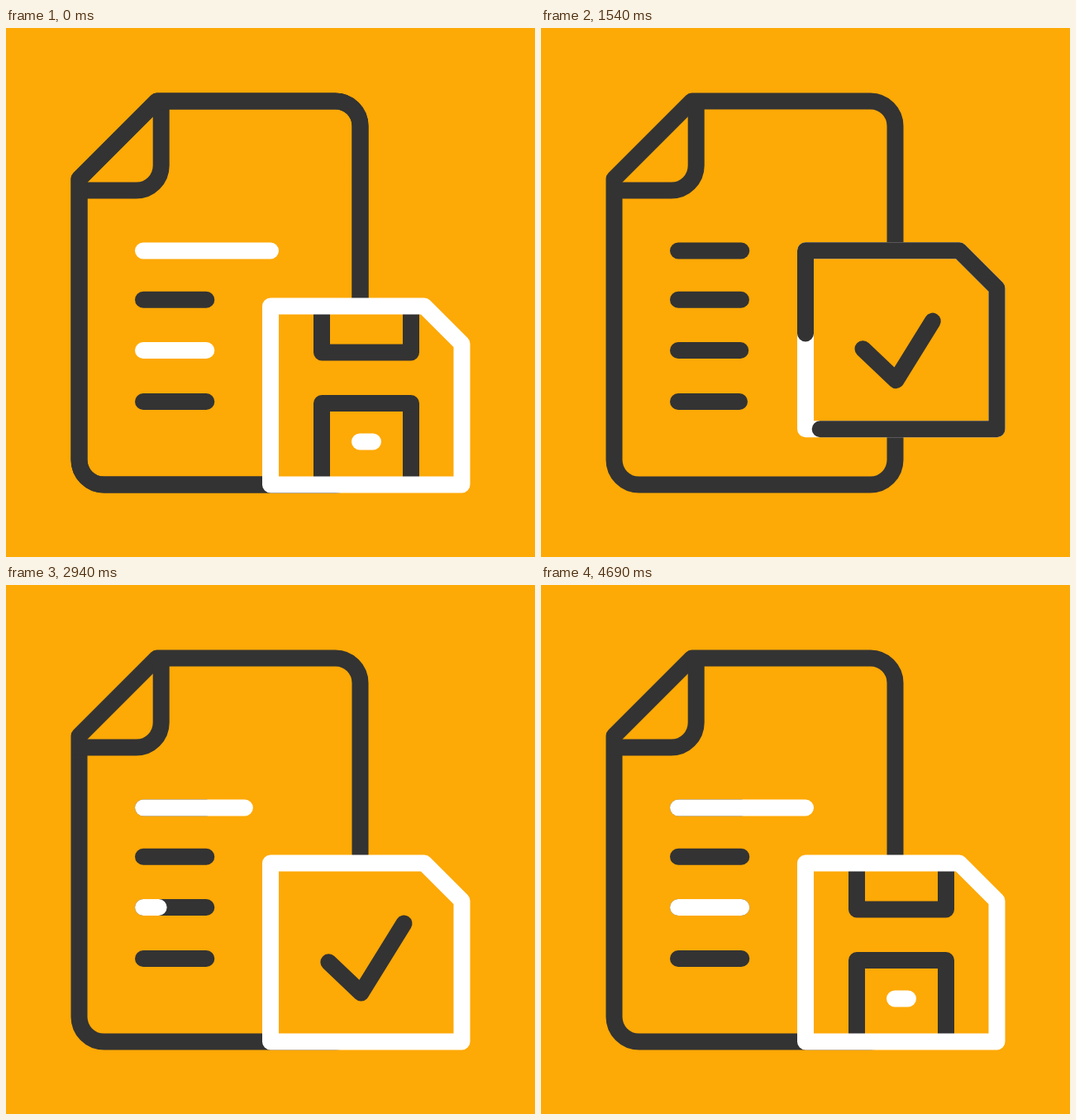
An HTML page with a canvas for the animation above (4.76 s loop, 640 px wide and 640 px high).

```html
<!DOCTYPE html>
<html>
<head>
<meta charset="utf-8">
<style>
html, body { margin: 0; width: 100%; height: 100%; overflow: hidden; background: #fda906; }
canvas { display: block; width: 100vw; height: 100vh; }
</style>
</head>
<body>
<canvas id="stage" width="640" height="640"></canvas>
<script>
const ctx = document.getElementById('stage').getContext('2d');
const LOOP = 4760, STEP = 70;
const BG = '#fda906', DARK = '#333333', WHITE = '#ffffff';

const clamp = v => Math.min(1, Math.max(0, v));
const smooth = (t, start, dur) => { const p = clamp((t - start) / dur); return p * p * (3 - 2 * p); };
const easeOut = (t, start, dur) => 1 - (1 - clamp((t - start) / dur)) ** 3;

function poly(points, closed) {
  const path = new Path2D();
  points.forEach(([x, y], i) => i ? path.lineTo(x, y) : path.moveTo(x, y));
  if (closed) path.closePath();
  return path;
}

function pathLength(points) {
  return points.slice(1).reduce((sum, [x, y], i) => sum + Math.hypot(x - points[i][0], y - points[i][1]), 0);
}

const docOutline = new Path2D('M182.5 88.5H398.5A30 30 0 0 1 428.5 118.5V522.5A30 30 0 0 1 398.5 552.5H118.5A30 30 0 0 1 88.5 522.5V182.5Z');
const docFold = new Path2D('M187.7 90V166.5A30 30 0 0 1 157.7 196.5H90');
const diskPoints = [[320, 336.5], [506, 336.5], [551.5, 382], [551.5, 552.5], [320, 552.5]];
const disk = poly(diskPoints, true);
const diskLength = pathLength([...diskPoints, diskPoints[0]]);
const shutter = poly([[382, 337], [382, 392.5], [490, 392.5], [490, 337]]);
const label = poly([[382, 552], [382, 454], [490, 454], [490, 552]]);
const checkPoints = [[389.5, 455.5], [429.5, 493.5], [481.5, 409.5]];
const check = poly(checkPoints);
const checkLength = pathLength(checkPoints);

const LEFT = 166, RIGHT = 242.3, LONG = 320;
const rows = [269.5, 328.8, 390, 452];

// Time, tail and head of the dark run travelling round the disk outline.
const run = [
  [420, 115, 115], [560, 158, 219], [1120, 446, 934], [1540, 768, 1503],
  [2450, 2135, 2319], [2620, 2430, 2430]
];

function runAt(t, column) {
  const slope = i => (run[i + 1][column] - run[i][column]) / (run[i + 1][0] - run[i][0]);
  const tangent = i => {
    if (i === 0) return slope(0);
    if (i === run.length - 1) return slope(i - 1);
    const a = slope(i - 1), b = slope(i);
    return 2 * a * b / (a + b);
  };
  const i = Math.min(run.length - 2, run.findIndex((k, n) => n < run.length - 1 && t <= run[n + 1][0]));
  const h = run[i + 1][0] - run[i][0], u = (t - run[i][0]) / h, v = 1 - u;
  return v * v * (1 + 2 * u) * run[i][column] + u * u * (3 - 2 * u) * run[i + 1][column]
    + h * u * v * (v * tangent(i) - u * tangent(i + 1));
}

function stroke(path, color) {
  ctx.strokeStyle = color;
  ctx.stroke(path);
}

function strokePart(path, color, from, to, gap) {
  ctx.setLineDash([to - from, gap]);
  ctx.lineDashOffset = -from;
  stroke(path, color);
  ctx.setLineDash([]);
}

function bar(y, end, color) {
  if (end > LEFT) stroke(poly([[LEFT, y], [end, y]]), color);
}

function drawDocument(t) {
  stroke(docOutline, DARK);
  stroke(docFold, DARK);
  rows.forEach((y, i) => bar(y, LEFT + (RIGHT - LEFT) * easeOut(t, 582 + 77 * i, 1055), DARK));
  bar(rows[0], LEFT + (LONG - LEFT) * smooth(t, 2300, 900), WHITE);
  bar(rows[2], LEFT + (RIGHT - LEFT) * smooth(t, 2650, 900), WHITE);
}

function drawLeavingSheet(t) {
  if (t >= 1155) return;
  ctx.save();
  ctx.clip(docOutline);
  ctx.beginPath();
  ctx.rect(0, 0, 640, 533);
  ctx.clip();
  ctx.translate(0, 480 * smooth(t, 200, 955));
  ctx.fillStyle = BG;
  ctx.fill(docOutline);
  stroke(docOutline, DARK);
  stroke(docFold, DARK);
  rows.forEach((y, i) => {
    const end = i ? RIGHT : LONG + (RIGHT - LONG) * smooth(t, 0, 560);
    bar(y, end, i % 2 ? DARK : WHITE);
  });
  ctx.restore();
  stroke(docOutline, DARK);
}

function drawDiskParts(t) {
  const shift = t < 2000 ? 212 * smooth(t, 390, 800) : -212 * (1 - smooth(t, 3620, 1000));
  if (Math.abs(shift) >= 211) return;
  ctx.save();
  ctx.clip(disk);
  ctx.translate(shift, 0);
  stroke(shutter, DARK);
  stroke(label, DARK);
  stroke(poly([[428, 500.5], [444, 500.5]]), WHITE);
  ctx.restore();
}

function drawDisk(t) {
  ctx.save();
  ctx.translate(0, -67.3 * (smooth(t, 321, 938) - smooth(t, 1668, 938)));
  ctx.fillStyle = BG;
  ctx.fill(disk);
  drawDiskParts(t);

  const from = checkLength * smooth(t, 2898, 824);
  const to = checkLength * smooth(t, 873, 824);
  if (to > from) strokePart(check, DARK, from, to, 2 * checkLength);

  stroke(disk, WHITE);
  if (t > run[0][0] && t < run[run.length - 1][0]) {
    const tail = runAt(t, 1), head = runAt(t, 2);
    const length = Math.min(head - tail, diskLength);
    const start = tail % diskLength;
    strokePart(disk, DARK, start, start + length, diskLength - length);
  }
  ctx.restore();
}

function draw(t) {
  ctx.fillStyle = BG;
  ctx.fillRect(0, 0, 640, 640);
  ctx.lineWidth = 20;
  ctx.lineCap = ctx.lineJoin = 'round';
  drawDocument(t);
  drawLeavingSheet(t);
  drawDisk(t);
}

const began = performance.now();
function tick() {
  const t = (performance.now() - began) % LOOP;
  draw(Math.floor(t / STEP) * STEP);
  requestAnimationFrame(tick);
}
tick();
</script>
</body>
</html>
```
